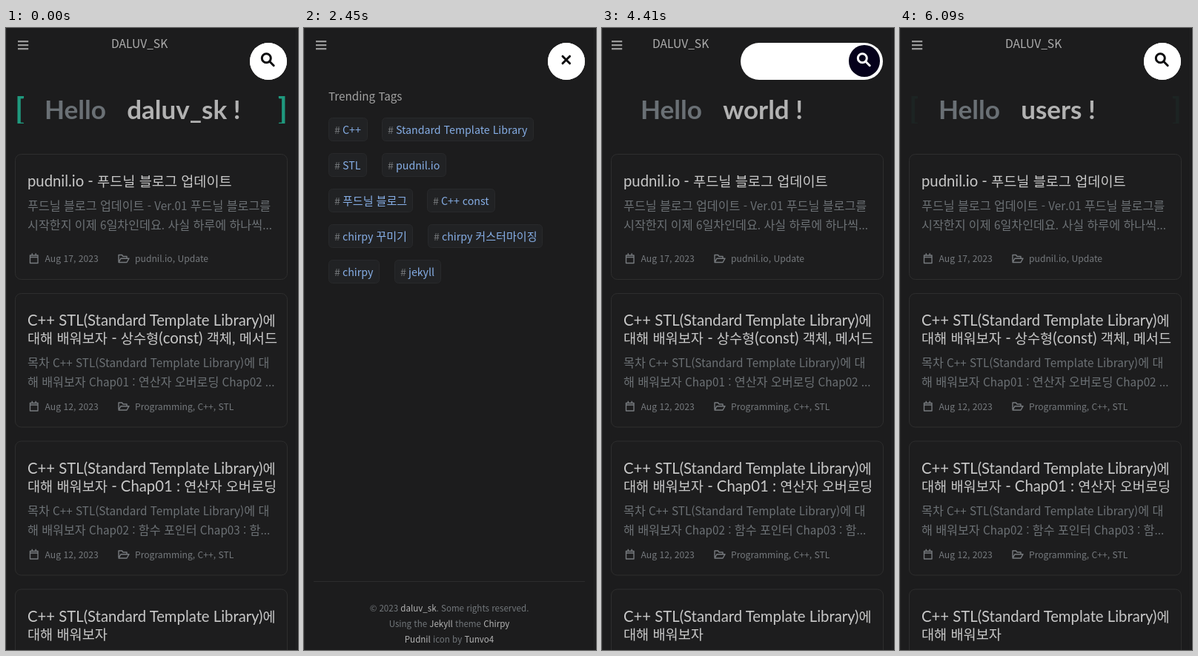
An HTML page that plays this animation: 394 by 840 pixels, repeating every 6.3 s.

```html
<!DOCTYPE html>
<html lang="ko">
<head>
<meta charset="utf-8">
<title>Blog</title>
<style>
html, body { margin: 0; width: 100%; height: 100%; overflow: hidden; background: #1c1c1d; }
svg { position: absolute; left: 0; top: 0; display: block; }
text, #field { font-family: "Noto Sans CJK KR", "Noto Sans CJK JP", "Noto Sans CJK", sans-serif; }
text { white-space: pre; }
.lato { font-family: Lato, "Noto Sans CJK KR", sans-serif; }
.ko { font-family: "Noto Sans CJK KR", "Noto Sans CJK", sans-serif; font-size: 1.062em; }
.lato .ko { font-size: .917em; }
.bold { font-weight: 700; }
.mid { text-anchor: middle; }
.hi { fill: #b4b4b4; }
.link { fill: #86aee6; }
#field, #button { position: absolute; border-radius: 25px; overflow: hidden; }
#field { top: 19.5px; height: 50px; background: #fff; }
#hint { position: absolute; left: 24px; top: 0; font-size: 14.2px; line-height: 49px; color: #777; }
</style>
</head>
<body>
<svg id="stage" width="394" height="840" viewBox="0 0 394 840"></svg>
<div id="field"><span id="hint">Search...</span></div>
<div id="button"></div>
<svg id="icons" width="394" height="80" fill="none" stroke-width="3" stroke-linecap="round">
  <path id="lens" d="M345.3 40.8a6 6 0 1 0 12 0a6 6 0 1 0-12 0M356 45.5l5.2 5.2"/>
  <path id="cross" d="M349 38.2l9.6 9.6m0-9.6l-9.6 9.6"/>
</svg>
<script>
const LOOP = 6300, STEP = 70;
const OPEN = 2286, CLOSE = 4405, SLIDE = 1000;
const USER = 'daluv_sk';
const $ = id => document.getElementById(id);

// Hangul runs get their own size beside the Latin text
const hangul = s => s.replace(/[가-힣]+/g, '<tspan class="ko">$&</tspan>');
const text = (x, y, size, fill, s, cls = '') =>
  `<text x="${x}" y="${y}" font-size="${size}" fill="${fill}" class="${cls}">${hangul(s)}</text>`;
const box = (x, y, w, h, r, fill, stroke) =>
  `<rect x="${x}" y="${y}" width="${w}" height="${h}" rx="${r}" fill="${fill}" stroke="${stroke}"/>`;

function card({ y, h, title, body = [], meta }) {
  let out = box(12.5, y, 367, h, 8, '#1d1d1e', '#2e2e2e');
  title.forEach((s, i) => out += text(29, y + 43.5 + i * 24, 20.3, '#c8c8c8', s, 'lato'));
  const top = y + 51.5 + title.length * 24;
  body.forEach((s, i) => out += text(29, top + i * 26, 15.25, '#6c7175', s));
  if (!meta) return out;
  const m = y + h - 28;
  return out + `<g fill="none" stroke="#777b7f" stroke-width="1.4" stroke-linejoin="round">
    <path d="M32.5 ${m - 4.5}h10.5v10.5h-10.5zM32.5 ${m - 2}h10.5M35.3 ${m - 7.2}v3M40.2 ${m - 7.2}v3"/>
    <path d="M152 ${m + 4}v-9h4.5l1.5 2h5v2.7M152 ${m + 5}l3-5.3h11l-3 5.3z"/></g>`
    + text(52.5, m + 4.5, 12.15, '#75797d', meta[0]) + text(174, m + 4.5, 12.15, '#75797d', meta[1]);
}

const stl = 'C++ STL(Standard Template Library)에';
const cards = [
  { y: 170.5, h: 169, title: ['pudnil.io - 푸드닐 블로그 업데이트'],
    body: ['푸드닐 블로그 업데이트 - Ver.01 푸드닐 블로그를', '시작한지 이제 6일차인데요. 사실 하루에 하나씩...'],
    meta: ['Aug 17, 2023', 'pudnil.io, Update'] },
  { y: 358.5, h: 180.5, title: [stl, '대해 배워보자 - 상수형(const) 객체, 메서드'],
    body: [`목차 ${stl} 대`, '해 배워보자 Chap01 : 연산자 오버로딩 Chap02 ...'],
    meta: ['Aug 12, 2023', 'Programming, C++, STL'] },
  { y: 558, h: 181, title: [stl, '대해 배워보자 - Chap01 : 연산자 오버로딩'],
    body: [`목차 ${stl} 대`, '해 배워보자 Chap02 : 함수 포인터 Chap03 : 함...'],
    meta: ['Aug 12, 2023', 'Programming, C++, STL'] },
  { y: 758, h: 180, title: [stl, '대해 배워보자'] }
];

const tags = [
  [33, 53, 'C++'], [105, 205, 'Standard Template Library'],
  [33, 52, 'STL'], [105, 87, 'pudnil.io'],
  [33, 114, '푸드닐 블로그'], [166, 92, 'C++ const'],
  [33, 114, 'chirpy 꾸미기'], [167, 155, 'chirpy 커스터마이징'],
  [33, 69, 'chirpy'], [122, 63, 'jekyll']
];
const tag = ([x, w, s], i) => {
  const y = 121.5 + (i >> 1) * 48;
  return box(x + .5, y, w - 1, 31, 5, '#212224', '#28292b')
    + text(x + 8, y + 21, 14.2, '#74777a', '#') + text(x + 19, y + 21, 14.2, '', s, 'link');
};

const hi = s => `<tspan class="hi">${s}</tspan>`;
const footer = [`© 2023 ${hi(USER)}. Some rights reserved.`,
  `Using the ${hi('Jekyll')} theme ${hi('Chirpy')}`,
  `${hi('Pudnil')} icon by ${hi('Tunvo4')}`];
const words = ['world !', 'users !', 'everybody!', USER + ' !'];

$('stage').innerHTML = `
  <path d="M.5 0v840M391.5 0v840" stroke="#232324"/>
  <path id="menu" d="M16 18.2h14.2M16 23.2h14.2M16 28.2h14.2" stroke="#9a9a9a" stroke-width="2.3"/>
  <g id="home">
    <g id="name">${text(142, 27, 15.6, '#adadad', USER.toUpperCase())}</g>
    <clipPath id="line"><rect x="12" y="89" width="368" height="40"/></clipPath>
    <g clip-path="url(#line)">
      ${text(52, 122.5, 35.2, '#6a7075', 'Hello', 'lato bold')}
      <g id="list">${words.map((s, i) => text(163.2, 122.5 + i * 40, 35, '#b2b2b2', s, 'lato bold')).join('')}</g>
      <g id="brackets">${text(12, 125.3, 42, '#209a7f', '[', 'lato bold')}
        <g text-anchor="end">${text(380, 125.3, 42, '#209a7f', ']', 'lato bold')}</g></g>
    </g>
    ${cards.map(card).join('')}
  </g>
  <g id="search">
    ${text(33, 97.5, 15.2, '#a2a2a2', 'Trending Tags')}
    ${tags.map(tag).join('')}
    <path d="M13 747.5h366" stroke="#2c2c2d"/>
    ${footer.map((s, i) => text(196, 787.5 + i * 21, 11.55, '#72777b', s, 'mid')).join('')}
  </g>`;

function bezier(x1, y1, x2, y2) {
  const at = (a, b, u) => 3 * (1 - u) * (1 - u) * u * a + 3 * (1 - u) * u * u * b + u * u * u;
  return x => {
    if (x <= 0) return 0;
    if (x >= 1) return 1;
    let lo = 0, hi = 1;
    for (let i = 0; i < 24; i++) {
      const u = (lo + hi) / 2;
      if (at(x1, x2, u) < x) lo = u; else hi = u;
    }
    return at(y1, y2, lo);
  };
}
const ease = bezier(.25, .1, .25, 1);
const back = bezier(.68, -.55, .265, 1.55);
const clamp = (v, a, b) => Math.min(b, Math.max(a, v));
const mix = (a, b, p) => `rgb(${a.map((v, i) => Math.round(v + (b[i] - v) * p))})`;

// Ten-second word wheel: down three lines, then back up
function wheel(s) {
  const stops = [0, 1, 2, 3, 2, 1, 0];
  const p = s % 10 * .6, k = Math.floor(p);
  return stops[k] + (stops[k + 1] - stops[k]) * ease((p - k - .76) / .24);
}
function pulse(s) {
  const p = s % 2;
  return p < 1 ? ease(p) : 1 - ease(p - 1);
}

function drawHeading(t) {
  // The heading rests while the brackets are nearly out
  if (t > 700 && t < 1260) t = 700;
  t = Math.min(t, 6090);
  const s = t < CLOSE ? 4.93 + t / 1000 : (t - CLOSE) / 1000;
  $('list').setAttribute('transform', `translate(0 ${-40 * wheel(s)})`);
  $('brackets').setAttribute('opacity', pulse(s));
}

function drawBar(t, searching) {
  const p = t < CLOSE ? back((t - OPEN) / SLIDE) : 1 - back((t - CLOSE) / SLIDE);
  const full = 50 + 250 * p, limit = searching ? 315 : 192;
  const w = clamp(full, 50, limit);
  const nudge = !searching && full > limit ? -3 : 0;
  $('menu').setAttribute('transform', `translate(${nudge})`);
  $('name').setAttribute('transform', `translate(${nudge - (w - 50) / 2})`);
  Object.assign($('field').style, { left: 379 - w + 'px', width: w + 'px' });
  const r = 25 - 3.5 * clamp(p, 0, 1.09), c = clamp(p, 0, 1);
  Object.assign($('button').style, {
    left: 354 - r + 'px', top: 44.5 - r + 'px', width: 2 * r + 'px', height: 2 * r + 'px',
    background: mix([255, 255, 255], [5, 1, 27], c)
  });
  $('icons').setAttribute('stroke', mix([12, 12, 14], [255, 255, 255], c));
}

const show = (id, on) => $(id).style.display = on ? '' : 'none';
const start = performance.now();

function frame() {
  const t = Math.floor((performance.now() - start) % LOOP / STEP) * STEP;
  const searching = t >= OPEN && t < CLOSE;
  ['home', 'lens'].forEach(id => show(id, !searching));
  ['search', 'cross', 'hint'].forEach(id => show(id, searching));
  drawHeading(t);
  drawBar(t, searching);
  requestAnimationFrame(frame);
}
frame();
</script>
</body>
</html>
```
